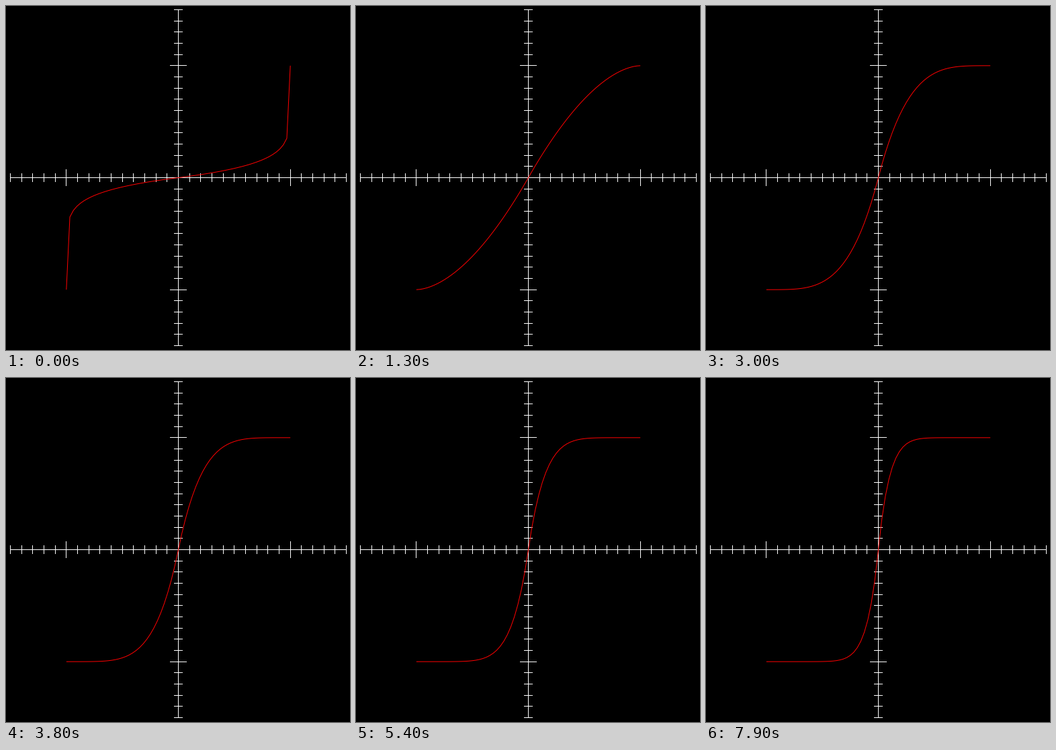
Recreate the animation shown at these times as a matplotlib script. Size 512 by 512 pixels, loop 8000 ms.

```python
import numpy as np
import matplotlib.pyplot as plt
from matplotlib.animation import FuncAnimation
from matplotlib.collections import LineCollection

SIZE, DPI = 512, 128
FRAMES, INTERVAL = 80, 100
CX, CY = 256.5, 255.5      # centre of the axes' crossing pixel
HALF = 250                 # axis half length, 1.5 units
UNIT = HALF / 1.5
PX = 72 / DPI              # one pixel in points

plt.rcParams["path.simplify"] = False
fig = plt.figure(figsize=(SIZE / DPI, SIZE / DPI), dpi=DPI, facecolor="black")
ax = fig.add_axes([0, 0, 1, 1])
ax.set(xlim=(0, SIZE), ylim=(SIZE, 0))
ax.axis("off")


def hline(x, y, half):
    return [(x - half - 0.5, y), (x + half + 0.5, y)]


def vline(x, y, half):
    return [(x, y - half - 0.5), (x, y + half + 0.5)]


lines = [hline(CX, CY, HALF), vline(CX, CY, HALF)]
for k in range(-15, 16):
    if k == 0:
        continue
    offset = round(k * UNIT / 10)
    half = 12 if abs(k) == 10 else 6
    lines += [vline(CX + offset, CY, half), hline(CX, CY + offset, half)]

grid = LineCollection(lines, colors="white", linewidths=PX, capstyle="butt")
grid.set_snap(False)
ax.add_collection(grid, autolim=False)

x = np.linspace(-1, 1, 65)
curve, = ax.plot(CX + UNIT * x, np.full_like(x, CY), color="red", lw=PX,
                 solid_capstyle="butt", snap=False, zorder=3)


def update(i):
    power = (i + 1) / 8
    y = np.sign(x) * (1 - (1 - np.abs(x)) ** power)
    curve.set_ydata(CY - UNIT * y)
    return curve,


anim = FuncAnimation(fig, update, frames=FRAMES, interval=INTERVAL,
                     repeat=True, repeat_delay=0)
plt.show()
```
